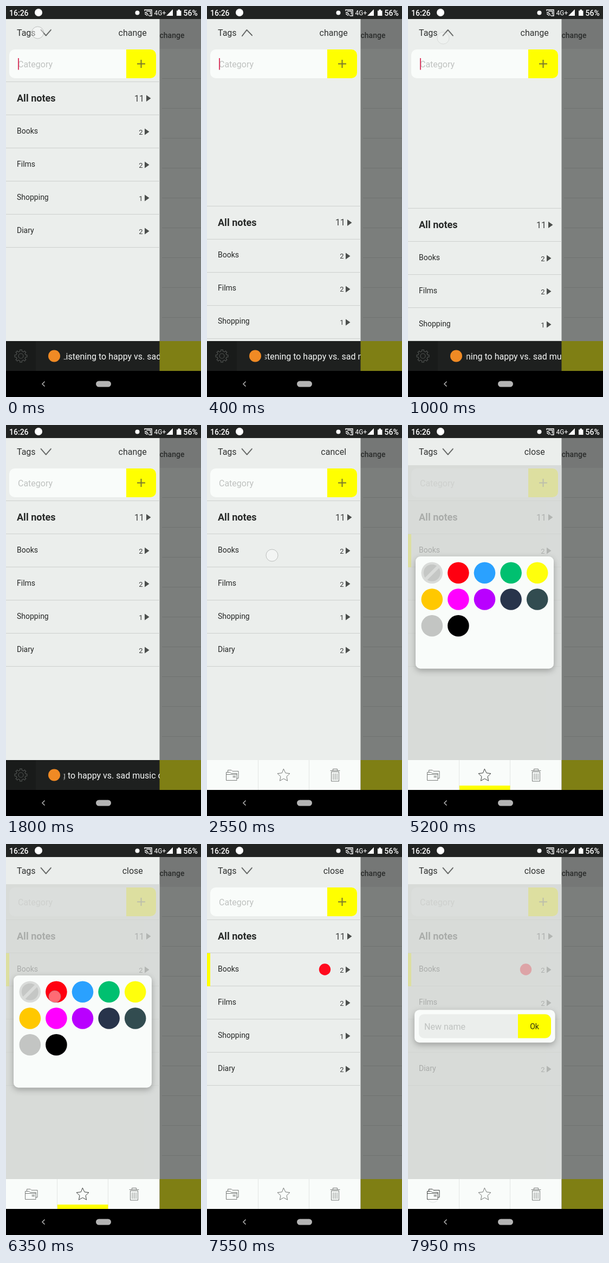
Write an HTML page that moves like this. It is 360 by 720 pixels and loops after 8 s.

```html
<!DOCTYPE html>
<html lang="en">
<head>
<meta charset="utf-8">
<title>Tags drawer</title>
<style>
html, body { margin: 0; width: 100%; height: 100%; overflow: hidden; background: #000; }
svg { display: block; width: 100%; height: 100%; font: 16px Roboto, sans-serif; }
.line { fill: #cdd0ce; }
.icon { fill: none; stroke: #777a78; stroke-width: 1; stroke-linejoin: round; stroke-linecap: round; }
.dark { stroke: #3c3f3d; }
.hint { fill: #bfc2c0; }
.head { fill: #303231; }
.touch { fill: #fff; fill-opacity: .42; stroke: #909492; stroke-opacity: .55; opacity: 0; }
</style>
</head>
<body>
<svg viewBox="0 0 360 720">
  <defs>
    <linearGradient id="edge" gradientUnits="userSpaceOnUse" x1="105" y1="0" x2="110" y2="0">
      <stop offset="0" stop-color="#000"/><stop offset="1" stop-color="#fff"/>
    </linearGradient>
    <mask id="fade" maskUnits="userSpaceOnUse" x="105" y="617" width="179" height="55">
      <rect x="105" y="617" width="179" height="55" fill="url(#edge)"/>
    </mask>
    <filter id="shadow" x="-20%" y="-40%" width="140%" height="200%">
      <feDropShadow dx="0" dy="4" stdDeviation="6" flood-color="#000" flood-opacity=".28"/>
    </filter>
  </defs>

  <!-- dimmed page behind the drawer -->
  <g id="page">
    <rect x="283" y="24" width="77" height="593" fill="#7b7e7c"/>
    <rect x="283" y="24" width="77" height="55" fill="#757776"/>
    <rect x="283" y="617" width="77" height="55" fill="#7f7f14"/>
    <text x="283.5" y="58.5" font-size="14" font-weight="500" fill="#2a2c2b">change</text>
  </g>

  <rect y="24" width="283.5" height="593" fill="#ebeeec"/>
  <rect x="6" y="80" width="271" height="53" rx="10" fill="#f9fcfa"/>
  <path d="M222 80H267a10 10 0 0 1 10 10V123a10 10 0 0 1 -10 10H222Z" fill="#ff0"/>
  <path d="M242 106.5H257M249.500 99V114" stroke="#77772e" stroke-width="2"/>
  <text class="hint" x="22" y="113">Category</text>
  <rect id="caret" x="22" y="96" width="2" height="21.500" fill="#dc4468"/>

  <g id="list"></g>
  <rect id="mark" y="201" width="6" height="61" fill="#ff0"/>
  <circle id="label" cx="217.5" cy="231" r="10.700" fill="#ff0a1e"/>

  <rect id="veil" y="74" width="283.500" height="543" fill="#d3d5d3" fill-opacity=".76"/>

  <g id="palette">
    <rect x="14" y="242" width="255" height="206.500" rx="9" fill="#f9fcfa" filter="url(#shadow)"/>
  </g>

  <g id="rename">
    <rect x="12" y="305.500" width="259.500" height="60" rx="9" fill="#f9fcfa" filter="url(#shadow)"/>
    <rect x="20" y="313.500" width="244" height="44" rx="9" fill="#ebeeec"/>
    <path d="M203 313.500H253a11 11 0 0 1 11 11V346.500a11 11 0 0 1 -11 11H203Z" fill="#ff0"/>
    <text class="hint" x="30" y="341.500">New name</text>
    <text x="233.500" y="341" font-size="14" text-anchor="middle" fill="#303010">Ok</text>
  </g>

  <text class="head" x="20" y="55">Tags</text>
  <g transform="translate(73.7 49.3)">
    <path id="arrow" class="icon" d="M-9.300 -5.500L0 5.200L9.300 -5.500" style="stroke:#303231;stroke-width:1.3"/>
  </g>
  <g class="head" text-anchor="middle">
    <text id="change" x="233.700" y="55">change</text>
    <text id="cancel" x="233.700" y="55">cancel</text>
    <text id="close" x="233.700" y="55">close</text>
  </g>

  <!-- news strip -->
  <rect y="617" width="283.500" height="55" fill="#1e201f"/>
  <rect y="617" width="55" height="55" fill="#191b1a"/>
  <path id="gear" class="icon" style="stroke:#4d504e;stroke-width:1.2"/>
  <circle class="icon" cx="27.500" cy="644.500" r="4.500" style="stroke:#4d504e;stroke-width:1.2"/>
  <circle cx="89" cy="644.500" r="11" fill="#f08a24"/>
  <g mask="url(#fade)">
    <text id="news" y="650.500" fill="#f6f8f7">Listening to happy vs. sad music on focus</text>
  </g>

  <!-- edit toolbar -->
  <g id="tools">
    <rect y="617" width="283.500" height="55" fill="#f9fcfa"/>
    <path d="M94.500 617V672M188.500 617V672" stroke="#e2e5e3"/>
    <rect id="tab" x="95" y="664" width="93.500" height="8" fill="#ff0"/>
    <g id="folder" class="icon">
      <path d="M38.500 639V635.500H45L47 637.500H58V650.500H55"/>
      <path d="M35.500 654V639.500H42.500L44.500 641.500H55V654ZM35.500 643.500H55M48 646.500H52.500M48 648.500H52.500"/>
    </g>
    <path id="star" class="icon"/>
    <path class="icon" d="M228 636.500H245M232.500 636V633.500H240.500V636M229.500 639V656H243.500V639ZM233 642V653M236.500 642V653M240 642V653"/>
  </g>

  <g id="touches"></g>

  <!-- system bars -->
  <rect width="360" height="24" fill="#212322"/>
  <g fill="#fff" font-size="14" font-weight="500">
    <text x="6" y="17.500">16:26</text>
    <circle cx="60" cy="12" r="7"/>
    <circle cx="242.500" cy="12.500" r="4"/>
    <text x="273.500" y="17" font-size="12" font-weight="400">4G+</text>
    <path d="M296 18L308 6V18Z"/>
    <path d="M315 8.500H317.500V6.500H321V8.500H323.500V18H315Z"/>
    <text x="327.500" y="17.500">56%</text>
  </g>
  <path d="M256 9V7H269V18H264M256 11.500a6.500 6.500 0 0 1 6.500 6.500M256 14.500a3.500 3.500 0 0 1 3.500 3.500M259 9.500H266.500V15.500" fill="none" stroke="#fff" stroke-width="1.400"/>
  <rect y="672" width="360" height="48" fill="#000"/>
  <path d="M71.500 691.500L67 696L71.500 700.500" fill="none" stroke="#b4b4b4" stroke-width="1.500"/>
  <rect x="166" y="690.500" width="28" height="11" rx="5.500" fill="#b4b4b4"/>
</svg>
<script>
const LOOP = 8000;
const $ = id => document.getElementById(id);
const add = (id, markup) => $(id).insertAdjacentHTML('beforeend', markup);

// points: [time, value, easing to the next point]
function track(el, prop, points) {
  const first = points[0], last = points[points.length - 1];
  const all = [[0, first[1]], ...points, [LOOP, last[1]]];
  el.animate(all.map(([t, v, easing = 'linear']) => ({ offset: t / LOOP, [prop]: v, easing })),
    { duration: LOOP, iterations: Infinity });
}

// hard on/off switching at the given times
function toggle(id, on, ...times) {
  const points = [[0, +on]];
  for (const t of times) {
    points.push([t, +on]);
    on = !on;
    points.push([t, +on]);
  }
  track($(id), 'opacity', points);
}

function touch(x, y, ...points) {
  add('touches', `<circle class="touch" cx="${x}" cy="${y}" r="11"/>`);
  track($('touches').lastElementChild, 'opacity', points);
}

// radial outline from a list of [angle in degrees, radius]
function radial(cx, cy, spots) {
  return 'M' + spots.map(([a, r]) => {
    const q = a * Math.PI / 180;
    return (cx + r * Math.sin(q)).toFixed(2) + ' ' + (cy - r * Math.cos(q)).toFixed(2);
  }).join('L') + 'Z';
}

for (let y = 134; y < 600; y += 55)
  add('page', `<rect x="288" y="${y - 1}" width="72" height="1" fill="#6f7270"/>`);

const rows = [['All notes', 11], ['Books', 2], ['Films', 2], ['Shopping', 1], ['Diary', 2]];
rows.forEach(([name, count], i) => {
  const y = 139 + 61 * i, big = i === 0;
  const tx = big ? 259 : 256, ty = y + (big ? 31 : 31.5);
  add('list', `<rect class="line" y="${y}" width="283.5" height="1"/>
    <text x="20" y="${y + (big ? 37 : 34.5)}" font-size="${big ? 18 : 14}" font-weight="${big ? 700 : 400}" fill="#262827">${name}</text>
    <text x="${big ? 255 : 252.5}" y="${y + (big ? 36.5 : 36.5)}" font-size="${big ? 16 : 13}" text-anchor="end" fill="#3c3e3d">${count}</text>
    <path d="M${tx} ${ty - 6}L${tx + 8.5} ${ty}L${tx} ${ty + 6}Z" fill="#4c4f4d"/>`);
});
add('list', '<rect class="line" y="444" width="283.5" height="1"/>');

const swatches = ['#d9dbd9', '#ff0010', '#2aa1ff', '#00c070', '#ffff0c', '#ffc800',
  '#ff00ff', '#b900ff', '#28344b', '#324c50', '#c3c5c3', '#000'];
swatches.forEach((color, i) => {
  const x = 44.3 + 48.6 * (i % 5), y = 272.3 + 48.7 * Math.floor(i / 5);
  add('palette', `<circle cx="${x}" cy="${y}" r="19.8" fill="${color}"/>`);
});
add('palette', `<circle cx="44.3" cy="272.3" r="15.5" fill="#c5c7c5"/>
  <path d="M32.300 284.300L56.300 260.300" stroke="#d9dbd9" stroke-width="6"/>`);

const teeth = [];
for (let a = 0; a < 360; a += 45) teeth.push([a - 13, 8.8], [a - 9, 11.5], [a + 9, 11.5], [a + 13, 8.8]);
$('gear').setAttribute('d', radial(27.5, 644.5, teeth));

const tips = [];
for (let a = 0; a < 360; a += 72) tips.push([a, 12], [a + 36, 5.8]);
$('star').setAttribute('d', radial(141.5, 645.5, tips));

// list and arrow
const ease = 'ease-in-out';
track($('list'), 'transform', [[120, 'translateY(0px)', ease], [430, 'translateY(233px)'],
  [1110, 'translateY(233px)', ease], [1420, 'translateY(0px)']]);
track($('arrow'), 'transform', [[120, 'rotate(0deg)', ease], [430, 'rotate(180deg)'],
  [1110, 'rotate(180deg)', ease], [1420, 'rotate(0deg)']]);

// news strip and toolbar
track($('news'), 'transform', [[0, 'translateX(102px)'], [1000, 'translateX(72.5px)'],
  [1800, 'translateX(45px)'], [2300, 'translateX(29px)']]);
track($('tools'), 'transform', [[2000, 'translateY(56px)', 'ease-out'], [2290, 'translateY(0px)']]);

// switches
toggle('caret', true, 505, 990, 1500, 2010, 2520, 3030, 3550, 4040, 4350);
toggle('change', true, 2000);
toggle('cancel', false, 2000, 4300);
toggle('close', false, 4300);
toggle('mark', false, 2700);
toggle('tab', false, 4300, 6450);
toggle('label', false, 6450);

// dialogs
const inOut = [[4300, 0], [4480, 1], [6430, 1], [6590, 0]];
const lateIn = [[7820, 0], [7940, 1]];
track($('palette'), 'opacity', inOut);
track($('rename'), 'opacity', lateIn);
track($('veil'), 'opacity', [...inOut, ...lateIn]);
track($('star'), 'stroke', [[4300, '#777a78'], [4480, '#3c3f3d'], [6430, '#3c3f3d'], [6590, '#777a78']]);
track($('folder'), 'stroke', [[7820, '#777a78'], [7940, '#3c3f3d']]);

// taps
touch(58.5, 49, [0, 1], [70, 1], [150, 0]);
touch(65, 59, [950, 0], [1000, .4], [1040, 1], [1100, 1], [1160, 0]);
touch(233, 50, [1840, 0], [1880, 1], [1980, 1], [2050, 0]);
touch(120, 240, [2500, 0], [2540, 1], [2680, 1], [2760, 0]);
touch(141, 648, [4090, 0], [4140, 1], [4270, 1], [4360, 0]);
touch(90, 281, [6150, 0], [6200, 1], [6370, 1], [6440, 0]);
touch(46, 649, [7740, 0], [7770, 1], [7850, 1], [7950, .4], [7990, 0]);
</script>
</body>
</html>
```
